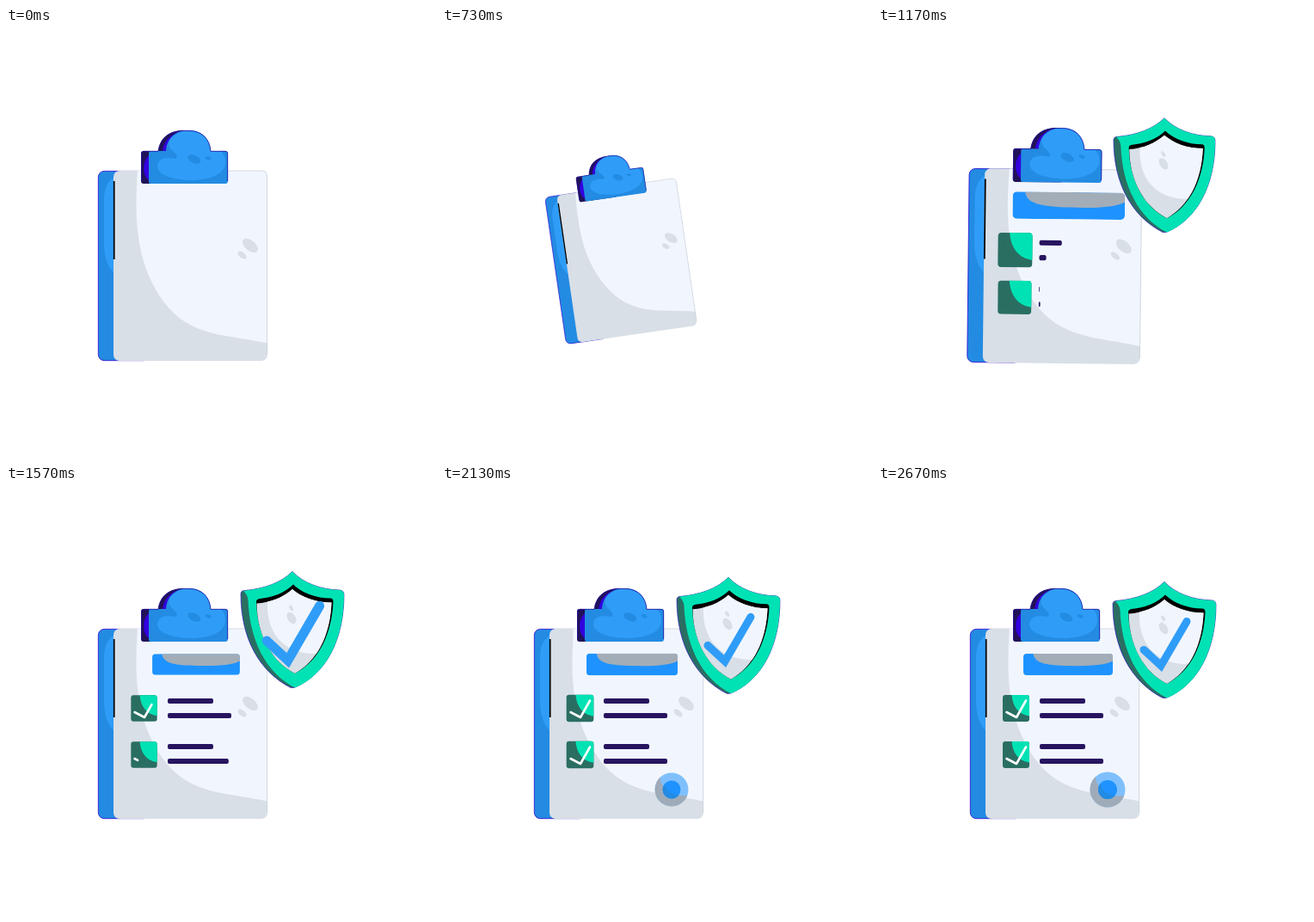
These frames come from a looping animation (500x500 px, 2710 ms). An HTML page:

```html
<!DOCTYPE html>
<html lang="en">
<head>
<meta charset="utf-8">
<title>Clipboard and shield</title>
<style>
html, body { margin: 0; width: 100%; height: 100%; overflow: hidden; background: #fff; }
svg { display: block; width: 100vw; height: 100vh; }
</style>
</head>
<body>
<svg viewBox="0 0 500 500">
  <defs>
    <clipPath id="backClip"><rect x="107" y="166" width="60" height="221" rx="7"/></clipPath>
    <clipPath id="paperClip"><rect x="125" y="166" width="179" height="221" rx="7"/></clipPath>
    <clipPath id="barClip"><rect x="169" y="195" width="104" height="25" rx="4"/></clipPath>
    <clipPath id="sealClip"><circle cx="267" cy="353" r="20.5"/></clipPath>
    <clipPath id="coreClip"><circle cx="267" cy="353" r="11"/></clipPath>
    <clipPath id="faceClip"><path d="M333 126.500C344 136 360 142 378.500 142C377 180 362 210 336 224.500C308 210 292 179 291.500 143C308 142 322 136 333 126.500Z"/></clipPath>
    <g id="box">
      <rect x="145" y="243" width="31" height="31" rx="3" fill="#2a6e62"/>
      <path d="M155.500 243H173Q176 243 176 246V267.500C164 266 156.500 257 155.500 243Z" fill="#00e2b4"/>
    </g>
  </defs>

  <g id="board">
    <rect x="107.300" y="166.400" width="60" height="220.300" rx="7" fill="#238be2" stroke="#2600d0" stroke-width=".8"/>
    <path d="M127 173C117 178 114 188 114 200V250C114 268 119 279 127 286Z" fill="#2f9df8" clip-path="url(#backClip)"/>
    <rect x="125" y="166" width="179" height="221" rx="7" fill="#d8dfe6"/>
    <path d="M153 166C149 225 152 268 177 309C209 360 250 355 304 366.500V166Z" fill="#f1f6fe" clip-path="url(#paperClip)"/>
    <path d="M258 166H297Q303.700 166 303.700 173V380" fill="none" stroke="#cbd1da" stroke-width=".8"/>
    <path d="M125.700 178V269" stroke="#000" stroke-width="1.700"/>
    <g fill="#d8dfe6">
      <ellipse cx="284" cy="253" rx="10.500" ry="6" transform="rotate(40 284 253)"/>
      <ellipse cx="274.500" cy="264" rx="6" ry="3.200" transform="rotate(38 274.500 264)"/>
    </g>

    <path d="M160 143H177C179 128 189 119 207 119H212V181H160Q157 181 157 178V146Q157 143 160 143Z" fill="#211258"/>
    <path d="M167 147Q160 153 160 163Q160 173 167 178ZM182 143Q184 126 203 120H212V143Z" fill="#3200de"/>
    <path d="M168 143H186C187 129 196 119 212 119S237 129 238 143H255Q258 143 258 146V178Q258 181 255 181H168Q166 181 166 179V145Q166 143 168 143Z" fill="#238be2"/>
    <path d="M208 119.200C193 124 183 133 194 143Q201 149 198 152C186 150 177 151 176 160C176 171 192 176 214 177C236 177 253 171 255 158Q256 148 249 143H238C237 129 228 117 208 119.200Z" fill="#2f9df8"/>
    <path d="M157.500 178V146Q157.500 143.300 160 143.300H177C179 128 190 119.400 207 119.400H212C228 119.400 237 129 238 143.300H255Q257.700 143.300 257.700 146V178" fill="none" stroke="#2410a0" stroke-width=".8"/>
    <g fill="#238be2">
      <ellipse cx="218.800" cy="152.500" rx="8" ry="4.500" transform="rotate(25 218.800 152.500)"/>
      <ellipse cx="235.300" cy="151.300" rx="3.500" ry="2" transform="rotate(22 235.300 151.300)"/>
    </g>

    <g id="bar" clip-path="url(#barClip)">
      <rect x="169" y="195" width="104" height="25" fill="#1e93ff"/>
      <path d="M180.500 195C182 206 195 208.500 222 209Q262 210 273 203.500V195Z" fill="#a3adb7"/>
    </g>
    <g id="box1"><use href="#box"/></g>
    <g id="box2"><use href="#box" y="54"/></g>
    <g fill="none" stroke="#fff" stroke-width="2.600" stroke-linecap="round" stroke-linejoin="round">
      <path id="tick1" pathLength="1" d="M149.500 263L161 269L172 249.500"/>
      <path id="tick2" pathLength="1" d="M149.500 317L161 323L172 303.500"/>
    </g>
    <g id="lines" fill="#27145f"></g>
    <g id="seal">
      <g clip-path="url(#sealClip)">
        <rect x="246" y="332" width="42" height="42" fill="#7fc0fc"/>
        <path d="M253 332C251 352 266 363 289 360V375H245V332Z" fill="#9fabb8"/>
      </g>
      <g clip-path="url(#coreClip)">
        <rect x="255" y="341" width="24" height="24" fill="#1e93ff"/>
        <path d="M258 341C258 354 267 361 280 360V366H254V341Z" fill="#238be2"/>
      </g>
    </g>
  </g>

  <g id="shield">
    <path d="M333 106C346 120 367 127 388 127.500Q393 128 393 133C393 185 372 226 335 241H331C294 222 273 183 273 132Q273 128 278 128C300 126 320 119 333 106Z" fill="#2a6e62" stroke="#2600c8" stroke-width=".6"/>
    <path d="M333 106C346 120 367 127 388 127.500Q393 128 393 133C393 185 372 226 336 241C302 224 283 185 281.500 139Q281 133 276 128.500C300 126 320 119 333 106Z" fill="#00e2b4"/>
    <path d="M334 121C344 131 361 137 377 137Q380.500 137 380.500 141C379 178 364 210 336 224.500C308 210 292 179 291 141Q291 138 295 137.500C310 136 324 131 334 121Z"/>
    <g clip-path="url(#faceClip)">
      <rect x="290" y="120" width="92" height="108" fill="#d8dfe6"/>
      <path d="M304 120V150C306 184 330 206 371 201L392 190V120Z" fill="#f1f6fe"/>
    </g>
    <g fill="#d8dfe6">
      <ellipse cx="332" cy="160" rx="4.500" ry="7.500" transform="rotate(-32 332 160)"/>
      <ellipse cx="331.700" cy="148.500" rx="2" ry="3.700" transform="rotate(-30 331.700 148.500)"/>
    </g>
    <path id="check" d="M309 185L329 203.500L359 152" fill="none" stroke="#2f9df8" stroke-width="9" stroke-linecap="round"/>
  </g>
</svg>
<script>
const LOOP = 2710, STEP = 100 / 3;
const el = id => document.getElementById(id);

// Eased value through [time, value] keys
function track(t, keys) {
  if (t <= keys[0][0]) return keys[0][1];
  for (let i = 1; i < keys.length; i++) {
    const [t0, a] = keys[i - 1], [t1, b] = keys[i];
    if (t < t1) {
      const u = (t - t0) / (t1 - t0);
      return a + (b - a) * u * u * (3 - 2 * u);
    }
  }
  return keys[keys.length - 1][1];
}

function pose(node, x, y, scale, angle = 0, dy = 0) {
  node.style.display = scale > 0.001 ? "" : "none";
  node.setAttribute("transform",
    `translate(${x} ${y + dy}) rotate(${angle}) scale(${scale}) translate(${-x} ${-y})`);
}

const boardScale = [[0, 1], [248, 1.3], [633, 0.7], [967, 1.083], [1267, 1]];
const boardTurn = [[0, 0], [315, 10.4], [645, -10], [1000, 1], [1400, 0]];
const shieldScale = [[1005, 0], [1240, 1.28], [1400, 0.92], [1535, 1]];
const checkScale = [[1370, 0], [1530, 1.26], [1730, 0.92], [1900, 1]];
const sealScale = [[1730, 0], [1930, 1.4], [2130, 0.95], [2330, 1]];
const settle = start => [[start, 0], [start + 238, 1.29], [1400, 0.9],
  [1570, 0.98], [2130, 1.02], [2670, 1]];

const pops = [
  ["bar", 221, 207.5, settle(960)],
  ["box1", 160.5, 258.5, settle(950)],
  ["box2", 160.5, 312.5, settle(960)],
  ["check", 334.5, 178.5, checkScale],
  ["seal", 267, 353, sealScale]
];
const ticks = [["tick1", 1400, 1620], ["tick2", 1520, 1740]];

// y, full width, start, end
const lines = [
  [247, 53, 1068, 1270], [264, 74, 1112, 1380],
  [300, 53, 1145, 1450], [317, 74, 1120, 1630]
].map(([y, w, start, end]) => {
  const r = document.createElementNS("http://www.w3.org/2000/svg", "rect");
  const attrs = { x: 188, y, height: 6, rx: 2, width: 0 };
  for (const k in attrs) r.setAttribute(k, attrs[k]);
  el("lines").appendChild(r);
  return { r, keys: [[start, 0], [end, w]] };
});

function draw(t) {
  pose(el("board"), 205.5, 253, track(t, boardScale), track(t, boardTurn));
  const bob = -2.2 + 7.6 * Math.cos(2 * Math.PI * (t - 2670) / 667);
  pose(el("shield"), 333, 173.5, track(t, shieldScale), 0, bob);
  for (const [id, x, y, keys] of pops) pose(el(id), x, y, track(t, keys));
  for (const [id, start, end] of ticks) {
    const p = track(t, [[start, 0], [end, 1]]);
    el(id).style.display = p > 0 ? "" : "none";
    el(id).setAttribute("stroke-dasharray", `${p} 2`);
  }
  for (const { r, keys } of lines) r.setAttribute("width", track(t, keys));
}

const begin = performance.now();
function tick(now) {
  const t = Math.max(0, now - begin) % LOOP;
  draw(Math.floor((t + 3.4) / STEP) * STEP);
  requestAnimationFrame(tick);
}
draw(0);
requestAnimationFrame(tick);
</script>
</body>
</html>
```
